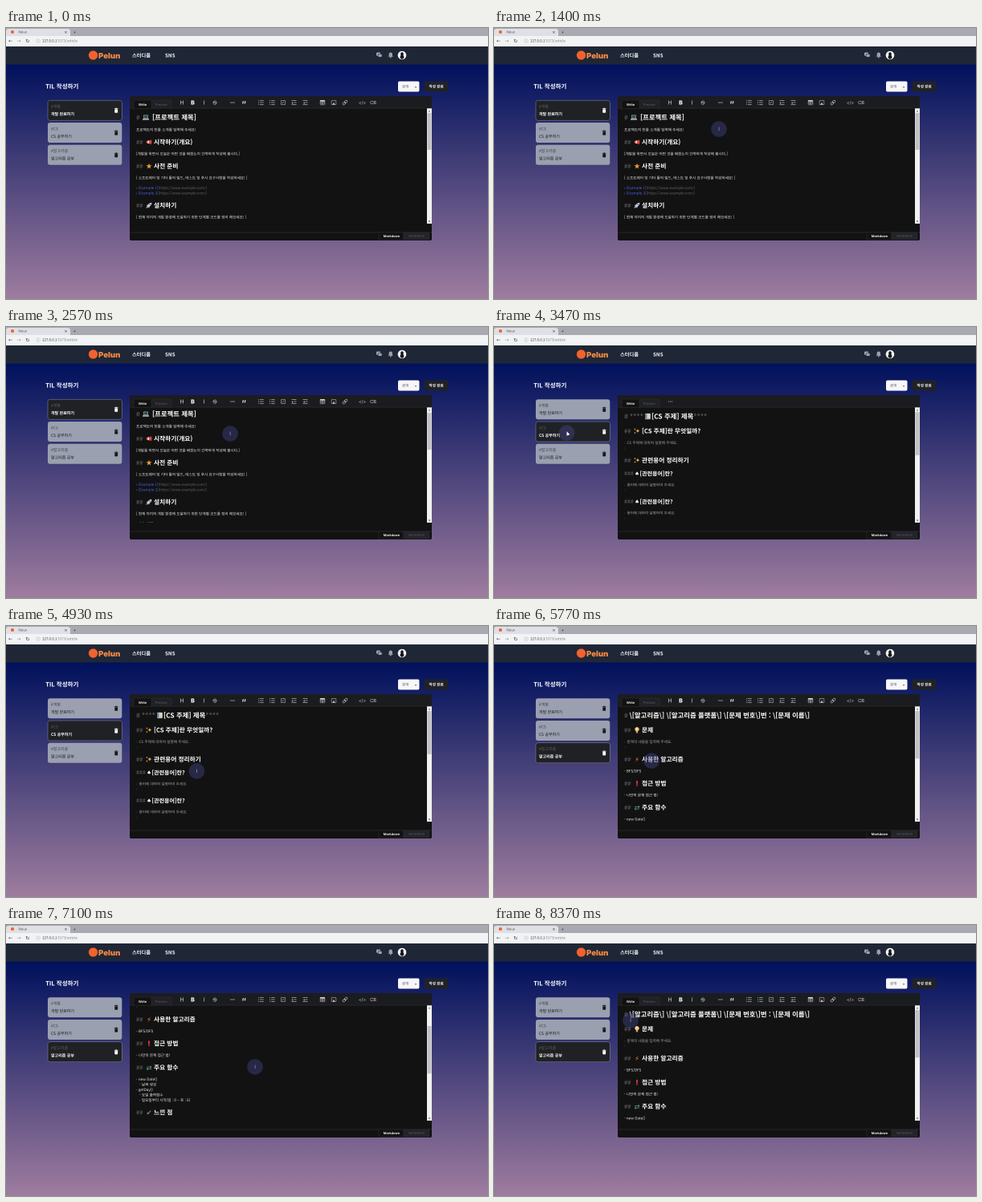
An HTML page with a canvas that plays this animation: 600x338 px, repeating every 8.41 s.

```html
<!DOCTYPE html>
<html lang="ko">
<head>
<meta charset="utf-8">
<title>TIL</title>
<style>
html, body { margin: 0; width: 100%; height: 100%; overflow: hidden; background: #00115c; }
canvas { display: block; width: 600px; height: 338px; }
</style>
</head>
<body>
<canvas id="stage"></canvas>
<script>
const LOOP = 8410, W = 600, H = 338;
const SANS = '"Noto Sans CJK KR", "Noto Sans CJK", "Noto Sans", sans-serif';
const LATIN = 'Inter, "Open Sans", sans-serif';
const MONO = '"Noto Sans Mono", "Noto Sans CJK KR", "Noto Sans CJK", monospace';
const SYMBOL = '"DejaVu Sans", sans-serif';
const WHITE = '#fff', DIM = '#555558', ICON = '#d5d5d5', PANEL = '#121213', EDGE = '#303135';

// twice the needed size, so that the tiny text keeps its even spacing
const scale = 2 * (window.devicePixelRatio || 1);
const canvas = document.getElementById('stage');
canvas.width = W * scale;
canvas.height = H * scale;
const c = canvas.getContext('2d');
c.textRendering = 'geometricPrecision';

// ---------- drawing helpers ----------
function rect(x, y, w, h, fill) {
  c.fillStyle = fill;
  c.fillRect(x, y, w, h);
}
function round(x, y, w, h, r, fill, stroke) {
  c.beginPath();
  c.roundRect(x, y, w, h, r);
  if (fill) { c.fillStyle = fill; c.fill(); }
  if (stroke) { c.strokeStyle = stroke; c.lineWidth = 0.5; c.stroke(); }
}
function oval(x, y, rx, ry, fill) {
  c.fillStyle = fill;
  c.beginPath();
  c.ellipse(x, y, rx, ry, 0, 0, 7);
  c.fill();
}
const disc = (x, y, r, fill) => oval(x, y, r, r, fill);
const bar = (x, y, w, color = ICON) => rect(x, y - 0.3, w, 0.6, color);

// runs draw with its origin at x, y
function at(x, y, draw, turn = 0) {
  c.save();
  c.translate(x, y);
  c.rotate(turn);
  draw();
  c.restore();
}
// y is the visual middle of the line
function text(s, x, y, size, color, o = {}) {
  c.font = `${o.style || ''} ${o.weight || 400} ${size}px ${o.font || SANS}`;
  c.textAlign = o.align || 'left';
  c.fillStyle = color;
  c.fillText(s, x, y + size * 0.36);
  return c.measureText(s).width;
}
const label = (s, x, y, size, color, weight, style) =>
  text(s, x, y, size, color, { font: LATIN, align: 'center', weight, style });
const symbol = (s, x, y, size, color) =>
  text(s + '\uFE0E', x, y, size, color, { font: SYMBOL, align: 'center' });
const glyph = (s, size, color) => () => symbol(s, 0, 0, size, color);

// ---------- small pictures in headings ----------
const pics = {
  laptop() {
    round(-3, -3, 6, 4.6, 0.5, '#9aa3a8');
    rect(-2.4, -2.4, 4.8, 3.3, '#2f4a58');
    round(-4, 1.6, 8, 1.6, 0.6, '#aeb4b7');
  },
  horn() {
    oval(0, 0, 3.6, 2, '#d9453f');
    oval(2, 0, 1.3, 3, '#d9453f');
    rect(-1.5, -1.8, 1.6, 3.6, '#f0e6e2');
  },
  rocket() {
    at(0, 0, () => {
      oval(0, 1.6, 2.5, 1.2, '#4b7fc4');
      oval(0, 3.2, 0.8, 1.5, '#ef8a35');
      oval(0, -0.8, 1.6, 3.6, '#c9d3da');
      disc(0, -1.6, 0.8, '#3d6ca5');
    }, Math.PI / 4);
  },
  bulb() {
    round(-1.2, 1, 2.4, 2.8, 0.5, '#a9a29b');
    disc(0, -1, 2.7, '#f6bd6c');
    disc(-0.5, -1.4, 1.2, '#ffe5b3');
  },
  sparkle() {
    symbol('✦', 0.8, 0, 8, '#f0a24c');
    for (const y of [-2.4, 2.4]) symbol('✦', -2.6, y, 4, '#f0a24c');
  },
  book() {
    round(-3.5, -3.6, 6.8, 7.2, 0.8, '#d8d3c8');
    rect(-3.5, -3, 2.4, 6, '#5b8299');
    bar(-1, 2.6, 4.6, '#c17c4d');
  },
  bang() { text('!', 0, 0, 9, '#e0393e', { font: LATIN, weight: 900, align: 'center' }); },
  star: glyph('★', 9.5, '#f5a02c'),
  check: glyph('✔', 8.5, '#78877c'),
  spade: glyph('♠', 6.5, WHITE),
  bolt: glyph('⚡', 8.5, '#f0803c'),
  turn: glyph('⇄', 8.5, '#5aa29a')
};

// ---------- document blocks: space before and after the middle, and a painter ----------
const headStyle = {
  1: { size: 8.4, pre: 11.5, post: 8.75, pic: 174, x: 182 },
  2: { size: 7.7, pre: 9.5, post: 8, pic: 178, x: 184 },
  3: { size: 7, pre: 8.5, post: 7.5, pic: 178, x: 181.5 }
};
const LINE = 6.5;

function head(level, pic, s, tail = '') {
  const { size, pre, post, pic: px, x } = headStyle[level];
  const sx = pic ? x : 168.5, bold = { weight: 700 };
  return { pre, post, draw(y) {
    text('#'.repeat(level), 162, y, size * 0.94, DIM, bold);
    if (pic) at(px, y, pics[pic]);
    text(s, sx, y, size, WHITE, bold);
  } };
}
function lines(paint, ...rows) {
  return { pre: 6.5, post: 6 + LINE * (rows.length - 1), draw(y) {
    rows.forEach((s, i) => paint(s, y + i * LINE));
  } };
}
function plain(s, y) {
  const sub = s.startsWith(' ');
  text(s.trim(), sub ? 166 : 162, y, 4.6, '#ececec', { weight: 500 });
}
function linked(s, y) {
  const w = text(`• [${s}]`, 162, y, 4.5, '#4a63e6', { weight: 500 });
  text('(https://www.example.com/)', 162 + w, y, 4.5, '#656568');
}
function quoted(s, y) {
  text('›', 162, y, 4.6, DIM);
  text(s, 165.5, y, 4.6, '#a3a3a3');
}
const para = (...rows) => lines(plain, ...rows);
const quote = s => lines(quoted, s, '');
const code = (lang, s) => ({ pre: 4.5, post: 22, draw(y) {
  rect(162, y, 354, 19, '#202127');
  text(lang, 169, y + 3, 3.9, '#a5a5a8', { font: MONO });
  text(s, 162, y + 9.4, 3.9, WHITE, { font: MONO, weight: 600 });
} });
const starred = s => ({ pre: 11.5, post: 8.75, draw(y) {
  const bold = { weight: 700 };
  text('# ****', 162, y, 8.4, DIM, bold);
  at(191.5, y, pics.book);
  const w = text(s, 196, y, 8.4, WHITE, bold);
  text('****', 196 + w, y, 8.4, DIM, bold);
} });

const step = (title, command) => [para(title), code('bash', command)];
const term = [head(3, 'spade', '[관련용어]란?'), quote('용어에 대하여 설명하여 주세요.')];

// pick: time of the click, down / up: start of each scroll, size: full text height
const docs = [
  { tag: '#개발', title: '개발 완료하기', pick: 0, down: 1520, up: 2200, depth: 198, size: 413, blocks: [
    head(1, 'laptop', '[프로젝트 제목]'),
    para('프로젝트의 한줄 소개를 입력해 주세요!'),
    head(2, 'horn', '시작하기(개요)'),
    para('[개발을 하면서 오늘은 어떤 것을 배웠는지 간략하게 작성해 봅시다.]'),
    head(2, 'star', '사전 준비'),
    para('[ 소프트웨어 및 기타 툴의 빌드, 테스트 및 푸시 요구사항을 작성하세요! ]'),
    lines(linked, 'Example 1', 'Example 2'),
    head(2, 'rocket', '설치하기'),
    para('[ 현재 까지의 개발 환경에 도달하기 위한 단계별 코드를 정리 해보세요! ]'),
    ...step('ex) 1. 설치', 'npm install'),
    para('작업 반복...'),
    ...step('ex) 2. Vue 설치', 'npm install -g@vue/cli'),
    para('작업 반복...'),
    ...step('ex) 3. 프로젝트 실행', 'npm run dev'),
    para('[시연을 위한 일부 데이터 출력물을 작성해 주세요! Ex. 실행 시 미리보기]'),
    head(2, 'bulb', '무엇을 배웠는가?'),
    para('[오늘 배운 것들을 작성해 봅시다.]'),
    head(2, 'check', '느낀점')
  ] },
  { tag: '#CS', title: 'CS 공부하기', pick: 3400, down: 4060, up: 4480, depth: 120, size: 352, blocks: [
    starred('[CS 주제] 제목'),
    head(2, 'sparkle', '[CS 주제]란 무엇일까?'),
    quote('CS 주제에 대하여 설명해 주세요.'),
    head(2, 'sparkle', '관련용어 정리하기'),
    ...term, ...term, ...term, ...term, ...term
  ] },
  { tag: '#알고리즘', title: '알고리즘 공부', pick: 5600, down: 5960, up: 6850, depth: 155, size: 320, blocks: [
    head(1, '', '\\[알고리즘\\] \\[알고리즘 플랫폼\\] \\[문제 번호\\]번 : \\[문제 이름\\]'),
    head(2, 'bulb', '문제'),
    quote('문제의 내용을 입력해 주세요.'),
    head(2, 'bolt', '사용한 알고리즘'),
    para('- BFS/DFS'),
    head(2, 'bang', '접근 방법'),
    para('- 나만의 문제 접근 법!'),
    head(2, 'turn', '주요 함수'),
    para('- new Date()', ' - 날짜 생성', '- getDay()', ' - 요일 출력함수', ' - 일요일부터 시작(일 : 0 ~ 토 : 6)'),
    head(2, 'check', '느낀 점'),
    para('- 문제를 풀며 내가 느낀 점!'),
    head(2, 'laptop', '풀이코드'),
    code('java', '코오오오오드'),
    head(2, 'laptop', '참고한 코드'),
    code('java', '다른사람 코오오오드'),
    para('...')
  ] }
];

// ---------- motion ----------
const SCROLL_MS = 400, MOVE_MS = 600;
// arrival time and place of each pointer move
const stops = [
  [1150, 280, 126], [1980, 279, 133], [3200, 90, 132], [4050, 245, 182],
  [5450, 92, 160], [6080, 310, 177], [8150, 170, 119]
];
function ramp(t, from, span) {
  const u = Math.min(1, Math.max(0, (t - from) / span));
  return u * u * (3 - 2 * u);
}
const scrollOf = (d, t) => d.depth * (ramp(t, d.down, SCROLL_MS) - ramp(t, d.up, SCROLL_MS));
function pointerAt(t) {
  let x = 300, y = 170;
  for (const [time, sx, sy] of stops) {
    const k = ramp(t, time - MOVE_MS, MOVE_MS);
    x += (sx - x) * k;
    y += (sy - y) * k;
  }
  return [x, y];
}

// ---------- page parts ----------
function browser() {
  rect(0, 0, W, 10, '#a9a9b2');
  round(0, 1, 80, 10, [3, 3, 0, 0], '#dfe0e5');
  rect(0, 10, W, 13, '#f1f3f4');
  disc(8, 5, 2, '#f2622e');
  text('Pelun', 15.5, 5, 4, '#45484c', { font: LATIN });
  label('×', 74.5, 5, 6, '#444');
  label('+', 85.5, 5, 6, '#444');
  symbol('←', 5.5, 16, 6, '#44474b');
  symbol('→', 16, 16, 6, '#8a8d91');
  symbol('↻', 27, 16, 6.5, '#44474b');
  symbol('ⓘ', 40, 16, 5, '#55585c');
  const w = text('127.0.0.1', 45, 16, 4.4, '#2b2d30');
  text(':5173/article', 45 + w, 16, 4.4, '#74777b');
}

function navbar() {
  const gray = '#9aa1ad', bold = { weight: 700 };
  rect(0, 23, W, 22.5, '#1f2636');
  disc(108.5, 34, 5.6, '#f2622e');
  text('Pelun', 115, 34.5, 9.6, '#f58a42', { font: LATIN, weight: 900 });
  text('스터디룸', 157, 34, 6.25, '#f2f3f5', bold);
  text('SNS', 198, 34, 6.25, '#f2f3f5', bold);
  round(461, 30.5, 5, 4.2, 1, gray);
  round(463.2, 32.5, 4.8, 3.8, 1, gray, '#1f2636');
  round(476.6, 30.5, 4.4, 5, [2.2, 2.2, 0, 0], gray);
  bar(475.8, 35.6, 6, gray);
  disc(478.8, 36.6, 0.9, gray);
  disc(493, 34, 5.3, '#f4f4f4');
  oval(493, 32.6, 1.8, 2.4, '#15161a');
  oval(493, 36.2, 2.4, 2.5, '#15161a');
}

function trash(color) {
  rect(-2.3, -2.5, 4.6, 0.8, color);
  rect(-0.8, -3.1, 1.6, 0.7, color);
  round(-1.9, -1.4, 3.8, 4.4, 0.6, color);
}

function sidebar(active) {
  text('TIL 작성하기', 49.2, 72.8, 7.5, WHITE, { weight: 700 });
  docs.forEach((d, i) => {
    const y = 90.2 + i * 27.8, on = i === active, ink = on ? WHITE : '#17181c';
    round(52, y, 92.3, 25, 2.6, on ? '#202124' : '#9aa0af', on && '#8b8f9c');
    text(d.tag, 56, y + 7.6, 5, on ? '#5d5f64' : '#3f434c');
    text(d.title, 56, y + 17, 5, ink, { weight: on ? 700 : 500 });
    at(137.2, y + 12.6, () => trash(ink));
  });
  round(488, 66.5, 26.5, 13, 2, '#f7f7f9');
  text('공개', 493, 73, 4.5, '#505358');
  symbol('⌄', 510, 72.4, 6, '#222');
  round(520.5, 66.5, 30, 13, 2, '#202227');
  text('작성 완료', 535.6, 73, 4.6, WHITE, { weight: 700, align: 'center' });
}

// three bars with a mark for each row
function list(mark) {
  for (const y of [-2.3, 0, 2.3]) {
    bar(-1.4, y, 4.6);
    mark(y);
  }
}
function indent(arrow) {
  for (const y of [-2.4, 0, 2.4]) bar(y ? -3 : 0, y, y ? 6 : 3);
  symbol(arrow, -1.6, 0, 4, ICON);
}
function box(rx, ry) { round(-rx, -ry, rx * 2, ry * 2, 0.5, '', ICON); }

function icons() {
  const y = 93;
  label('H', 219, y, 7, ICON);
  label('B', 232.5, y, 7, WHITE, 800);
  label('I', 246.5, y, 7, ICON, 400, 'italic');
  label('S', 260, y, 6.6, ICON);
  bar(257, y, 6);
  bar(279, y, 6);
  label('“', 296, y + 2.2, 11, ICON, 700);
  at(317.5, y, () => list(dy => disc(-2.8, dy, 0.5, ICON)));
  at(331.5, y, () => list(dy => rect(-3.1, dy - 0.6, 0.6, 1.2, ICON)));
  at(345, y, () => { box(2.7, 2.7); symbol('✓', 0, 0, 4.5, ICON); });
  at(358.5, y, () => indent('▸'));
  at(372.5, y, () => indent('◂'));
  at(394, y, () => {
    box(2.9, 2.8);
    rect(-2.9, -2.8, 5.8, 1.6, ICON);
    bar(-2.9, 0.7, 5.8);
    rect(-0.3, -1.5, 0.6, 4.3, ICON);
  });
  at(408, y, () => { box(2.9, 2.6); symbol('▲', 0, 0.9, 3.6, ICON); });
  at(422, y, () => {
    for (const x of [-3.6, -0.4]) round(x, -1.3, 4, 2.6, 1.3, '', ICON);
  }, -Math.PI / 4);
  label('</>', 443.5, y, 5.4, ICON);
  label('CB', 457, y, 5.6, ICON);
}

function editor(doc, scroll, loading) {
  const top = 100.3, view = 143.7, track = 132;
  round(154, 85, 376, 180, 2, PANEL);
  round(154, 85, 376, 15.2, [2, 2, 0, 0], '#1b1c20');
  bar(154, 100, 376, EDGE);
  round(181, 90, 25, 10, [1, 1, 0, 0], '#202126', EDGE);
  round(159, 90, 22, 10.5, [1, 1, 0, 0], PANEL, EDGE);
  label('Write', 170, 95.6, 4, WHITE, 600);
  label('Preview', 193.3, 95.6, 4, '#5b5c62');
  if (loading) for (let i = -1; i < 2; i++) disc(219.5 + i * 2, 93, 0.55, ICON);
  else icons();

  c.save();
  c.beginPath();
  c.rect(154, top, 370, view);
  c.clip();
  let y = 100 - scroll;
  for (const b of doc.blocks) {
    y += b.pre;
    b.draw(y);
    y += b.post;
  }
  c.restore();

  rect(524, top, 6, view, '#f1f1f1');
  rect(524.5, 106 + scroll / doc.size * track, 5, view * track / doc.size, '#c1c1c3');
  symbol('▴', 527, 103, 4, '#555');
  symbol('▾', 527, 241.2, 4, '#333');

  bar(154, 255, 376, EDGE);
  round(464, 255, 31, 9, 0, PANEL, EDGE);
  round(495, 255, 32, 9, 0, '#232429', EDGE);
  label('Markdown', 480, 259.8, 4, WHITE, 600);
  label('WYSIWYG', 511, 259.8, 4, '#5b5c62');
}

function pointer(t) {
  const [x, y] = pointerAt(t);
  c.globalAlpha = ramp(t, 600, 200);
  disc(x, y, 9.8, 'rgba(74, 78, 150, 0.38)');
  if (x > 154) label('I', x, y, 6, '#b9b9cc');
  else at(x, y, () => {
    c.beginPath();
    c.moveTo(0, -2);
    c.lineTo(0, 3.5);
    c.lineTo(3.8, 2);
    c.closePath();
    c.fillStyle = WHITE;
    c.fill();
  });
  c.globalAlpha = 1;
}

function frame() {
  const t = performance.now() % LOOP;
  const active = docs.filter(d => t >= d.pick).length - 1;
  const doc = docs[active];
  c.setTransform(scale, 0, 0, scale, 0, 0);
  const sky = c.createLinearGradient(0, 45, 0, H);
  sky.addColorStop(0, '#00115c');
  sky.addColorStop(1, '#9f7d9f');
  rect(0, 0, W, H, sky);
  browser();
  navbar();
  sidebar(active);
  editor(doc, scrollOf(doc, t), active > 0 && t - doc.pick < 120);
  pointer(t);
  requestAnimationFrame(frame);
}
frame();
</script>
</body>
</html>
```
